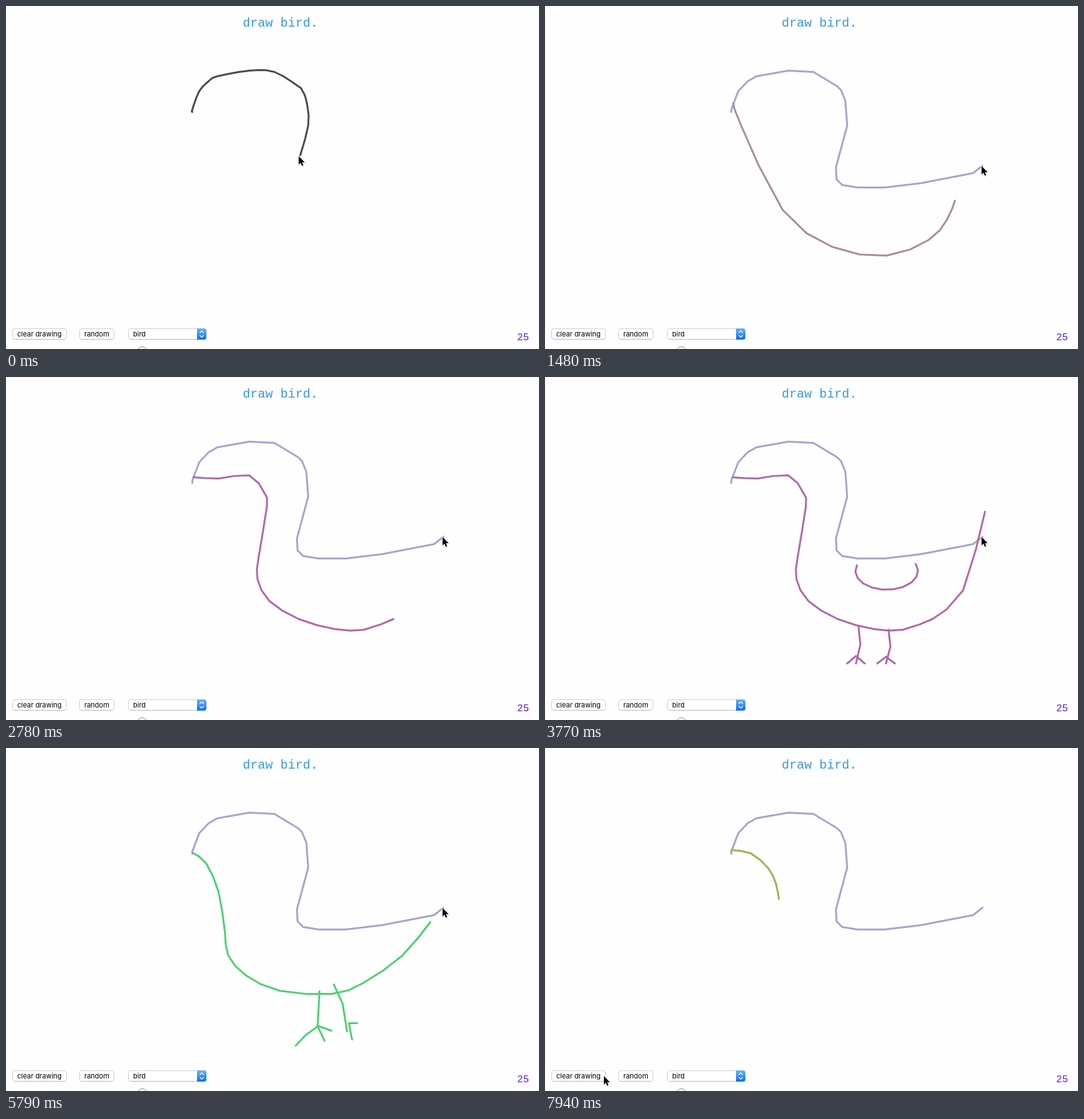
An HTML page that plays this animation: 851x549 px, repeating every 8 s.

```html
<!DOCTYPE html>
<html lang="en">
<head>
<meta charset="utf-8">
<title>draw bird</title>
<style>
  html, body { margin: 0; width: 100%; height: 100%; overflow: hidden; background: #fefefe; }
  svg { display: block; width: 100vw; height: 100vh; }
  .line { fill: none; stroke-width: 3; stroke-linecap: round; stroke-linejoin: round; }
  .mono { font-family: "Liberation Mono", monospace; }
  .ui { font: 11px Inter, sans-serif; }
  .box { fill: #fff; stroke: #cfcfcf; }
  .shade { stroke: #b8b8b8; }
</style>
</head>
<body>
<svg viewBox="0 0 851 549" xmlns="http://www.w3.org/2000/svg">
  <defs>
    <linearGradient id="blue" x2="0" y2="1">
      <stop stop-color="#6bb3fa"/><stop offset="1" stop-color="#0a6cfc"/>
    </linearGradient>
  </defs>

  <text class="mono" x="378" y="33" font-size="20" fill="#3498db">draw bird.</text>
  <text class="mono" x="816" y="535" font-size="16" fill="#5f22dc">25</text>

  <rect class="box" x="10.5" y="516.5" width="86" height="17" rx="3.5"/>
  <path class="shade" d="M13 533.5H94"/>
  <text class="ui" x="18" y="529">clear drawing</text>
  <rect class="box" x="117.5" y="516.5" width="55" height="17" rx="3.5"/>
  <path class="shade" d="M120 533.5H170"/>
  <text class="ui" x="125" y="529">random</text>
  <rect class="box" x="195.5" y="516.5" width="124" height="17" rx="3.5"/>
  <path class="shade" d="M198 533.5H305"/>
  <text class="ui" x="203" y="529">bird</text>
  <path fill="url(#blue)" d="M305 516h11a4 4 0 0 1 4 4v10a4 4 0 0 1-4 4h-11z"/>
  <path fill="none" stroke="#fff" stroke-width="1.3" stroke-linecap="round" stroke-linejoin="round"
        d="M309.7 522.8l2.8-2.8 2.8 2.8M309.7 527.2l2.8 2.8 2.8-2.8"/>
  <circle cx="217.5" cy="553" r="7.7" fill="#fff" stroke="#8a8a8a"/>

  <g class="line" transform="translate(.5 .5)">
    <path id="user"/>
    <path id="model"/>
  </g>
  <g id="cursor">
    <path d="M.5 1v13.5l3-2.8 2.2 4.9 2.2-.9-2.1-4.7h4.3z" opacity=".14" stroke="#000" stroke-width="1.6"/>
    <path d="M0 0v13.5l3-2.8 2.2 4.9 2.2-.9-2.1-4.7h4.3z" stroke="#fff" stroke-width="1.6" paint-order="stroke"/>
  </g>
</svg>
<script>
const LOOP = 8000;
const REFRESH = 100, PHASE = 80; // the screen updates in steps
const TICK = 18;                 // ms per sketched point

const clamp = v => Math.min(1, Math.max(0, v));
const ease = v => clamp(v) ** 2 * (3 - 2 * clamp(v));
const mix = (a, b, k) => a.map((v, i) => v + (b[i] - v) * k);
const parse = text => text.split(' ').map(p => p.split(',').map(Number));

// Catmull-Rom between b and c
const spline = (a, b, c, d, k) => b.map((v, i) => v + k / 2 * (c[i] - a[i] +
  k * (2 * a[i] - 5 * v + 4 * c[i] - d[i] + k * (3 * (v - c[i]) + d[i] - a[i]))));

function sample(keys, steps, smooth) {
  const points = [keys[0]];
  const at = i => keys[Math.min(keys.length - 1, Math.max(0, i))];
  for (let i = 1; i < keys.length; i++) {
    for (let s = 1; s <= steps; s++) {
      points.push(smooth ? spline(at(i - 2), at(i - 1), at(i), at(i + 1), s / steps)
                         : mix(at(i - 1), at(i), s / steps));
    }
  }
  return points;
}

const commands = points => points.map((p, i) => (i ? 'L' : 'M') + p);
const curve = text => commands(sample(parse(text), 2, true));
const line = text => commands(sample(parse(text), 2, false));

const leg = (x, y, h) => [
  ...line(`${x},${y} ${x + 3},${y + h / 2} ${x - 4},${y + h}`),
  ...line(`${x - 18},${y + h} ${x - 4},${y + h * .8} ${x + 10},${y + h}`)
];
const wing = (x, y, r) => commands(Array.from({ length: 12 }, (_, i) => {
  const angle = Math.PI * (1.1 - i / 9);
  return [x + r * Math.cos(angle), y + r * .6 * Math.sin(angle)];
}));

const outline = parse('297,169 297,165 308,136 323,120 337,112 388,103 428,105 466,128 472,134 479,151 ' +
  '482,191 464,258 465,277 474,286 499,290 542,290 600,283 683,267 698,255');
const drawn = sample(outline, 3, true);
const DRAWN_FIRST = 33;

const sketch = (start, color, ...strokes) => ({ start, color, points: strokes.flat() });
const sketches = [
  sketch(1205, '#a9908a',
    curve('300,155 311,187 379,326 458,385 545,399 612,374 641,342 654,311'),
    line('654,311 697,262'), leg(480, 392, 37), leg(548, 399, 30), wing(500, 320, 50),
    line('303,180 284,193 309,203')),
  sketch(2361, '#b069a8',
    curve('299,160 339,162 388,157 412,185 416,207 403,287 401,323 420,358 467,387 525,403 571,404 618,387'),
    curve('618,387 667,341 702,215'), leg(500, 398, 60), leg(548, 404, 54), wing(545, 310, 50)),
  sketch(3757, '#6a5fce',
    curve('302,162 297,190 315,244 344,281 388,315 460,351 502,360 550,360 598,339 641,302 657,275'),
    line('325,163 325,169'),
    curve('500,224 530,246 543,292 514,318 466,324 438,311 428,289'),
    line('311,193 281,219 293,219 323,209'),
    line('460,357 466,385 469,409 450,441'), leg(510, 360, 78)),
  sketch(4983, '#4cd16f',
    curve('299,168 319,184 339,230 349,294 354,331 382,363 436,388 520,393 569,376 632,332 677,278'),
    line('500,389 497,445 478,459 462,476'), line('497,444 519,452'), line('497,445 508,468'),
    line('523,378 537,409 544,453'), line('560,440 547,440 552,466'), wing(480, 315, 50)),
  sketch(6019, '#4560d5',
    line('301,165 290,194 254,232 284,223 322,210'),
    curve('322,210 345,222 351,255 364,322 401,361 459,385 523,389 568,378 615,349 655,291 684,246'),
    line('478,387 473,413 462,437 442,440 414,454'), line('453,440 491,473'), leg(523, 389, 70)),
  sketch(6980, '#d08a4a',
    curve('298,160 330,174 358,212 382,288 432,356 510,381 594,355 653,282'),
    leg(482, 378, 60), leg(530, 380, 60)),
  sketch(7713, '#95b84f', curve('297,163 328,168 356,192 368,216 373,241'))
];

const REST = [697, 256], HOVER = [105, 514], PRESS = [94, 525];

function cursorAt(t, tip) {
  if (tip) return mix(tip, [tip[0] - 2, tip[1] + 2], 1);
  return mix(mix(REST, HOVER, ease((t - 6130) / 500)), PRESS, ease((t - 6860) / 300));
}

const [user, model, cursor] = ['user', 'model', 'cursor'].map(id => document.getElementById(id));

function show(path, d, color) {
  path.setAttribute('d', d.join(''));
  path.setAttribute('stroke', color);
}

function render(time) {
  const t = Math.max(0, Math.floor((time - PHASE) / REFRESH) * REFRESH + PHASE);
  const current = sketches.findLast(s => s.start <= t);
  let tip;
  if (current) {
    show(user, commands(outline), '#a8a3cf');
    show(model, current.points.slice(0, Math.floor((t - current.start) / TICK)), current.color);
  } else {
    const progress = clamp((t - PHASE) / 780);
    const count = Math.round(DRAWN_FIRST + (drawn.length - DRAWN_FIRST) * progress);
    tip = drawn[count - 1];
    show(user, commands(drawn.slice(0, count)), '#444d4c');
    show(model, [], 'none');
  }
  cursor.setAttribute('transform', `translate(${cursorAt(t, tip)})`);
}

const begin = performance.now();
function loop() {
  render((performance.now() - begin) % LOOP);
  requestAnimationFrame(loop);
}
loop();
</script>
</body>
</html>
```
